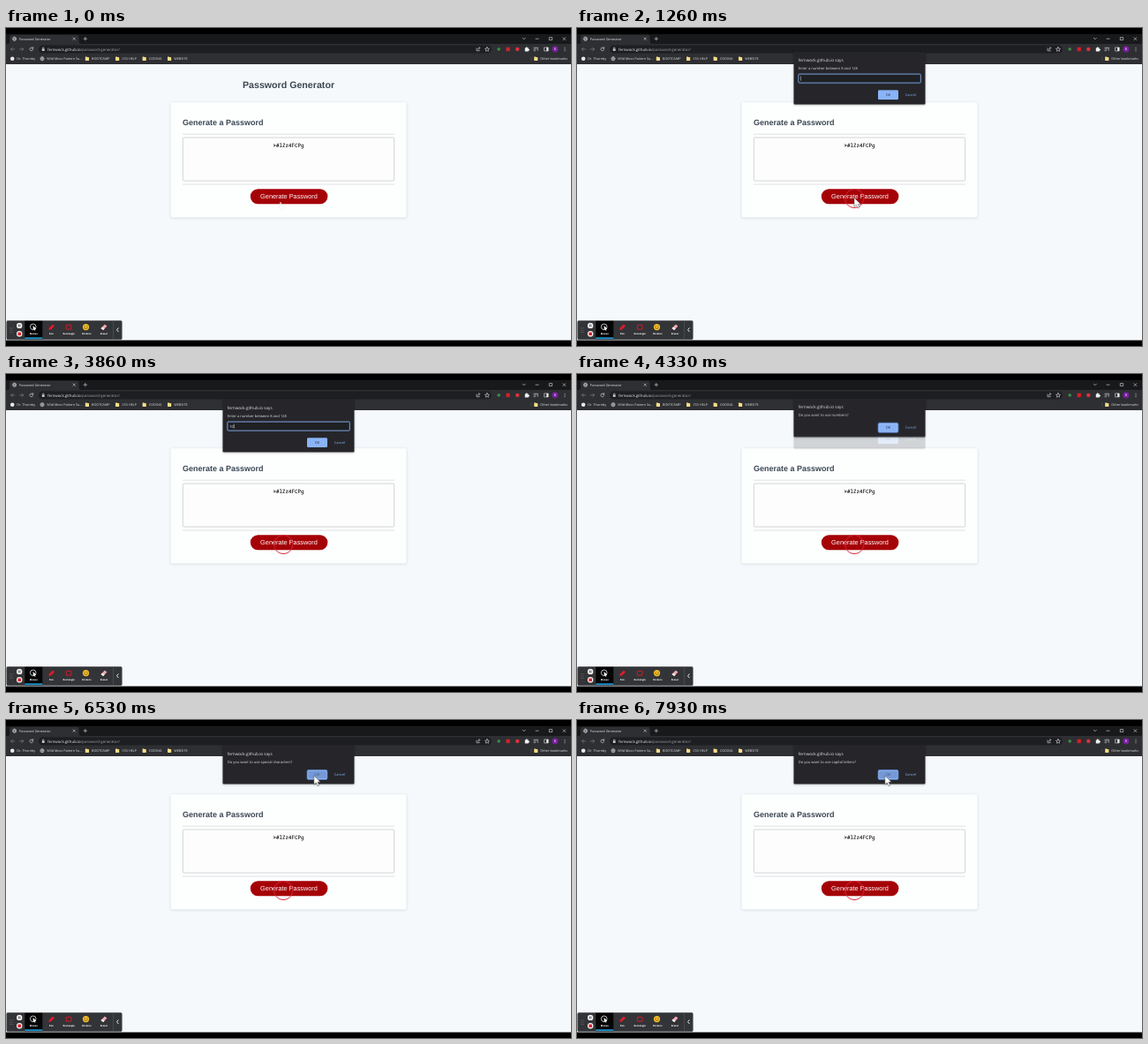
An HTML page for the animation above (8 s loop, 640 by 360 pixels).

```html
<!DOCTYPE html>
<html lang="en">
<head>
<meta charset="utf-8">
<title>Password Generator</title>
<style>
html, body { margin: 0; width: 100%; height: 100%; overflow: hidden; background: #000; }
svg { display: block; width: 100vw; height: 100vh; }
text { font-family: "Open Sans", "Noto Sans", sans-serif; text-rendering: geometricPrecision; }
.page text { font-family: "Liberation Sans", Arial, sans-serif; }
.page .mono { font-family: "Noto Sans Mono", "DejaVu Sans Mono", monospace; }
.ui { font-size: 3.75px; fill: #e2e4e7; }
.line { fill: none; stroke: #d0d3d6; stroke-width: .65; stroke-linecap: round; stroke-linejoin: round; }
.mid { text-anchor: middle; }
.head { font-size: 4.65px; fill: #e8eaed; }
.msg { font-size: 4.08px; fill: #dcdee2; }
.btn { font-size: 3.9px; text-anchor: middle; }
.label { font-size: 2.7px; font-weight: 700; fill: #fff; text-anchor: middle; }

.anim { animation: 8s linear infinite; }
.prompt { animation-name: prompt; }
.numbers { animation-name: numbers; }
.special { animation-name: special; }
.capital { animation-name: capital; }
.hand { animation-name: hand; }
.arrow { animation-name: arrow; }
.ripple { animation-name: ripple; }
.caret { animation-name: caret; }
.hover { animation-name: hover; }
.d1 { animation-name: digit1; }
.d2 { animation-name: digit2; }

@keyframes prompt {
  0%, 14.1% { opacity: 0; transform: translateY(-7px); }
  15.2% { opacity: 1; }
  16.4%, 52.9% { opacity: 1; transform: none; }
  54.4%, 100% { opacity: 0; transform: translateY(-4.8px); }
}
@keyframes numbers {
  0%, 52.9% { opacity: 0; transform: translateY(-7px); }
  53.7% { opacity: 1; }
  54.1% { transform: translateY(-1.3px); }
  54.9%, 75.8% { opacity: 1; transform: none; }
  76.6%, 100% { opacity: 0; transform: none; }
}
@keyframes special {
  0%, 75% { opacity: 0; transform: translateY(-7px); }
  75.8% { opacity: 1; }
  76.2% { transform: translateY(-1.3px); }
  77%, 87.7% { opacity: 1; transform: none; }
  88.5%, 100% { opacity: 0; transform: none; }
}
@keyframes capital {
  0%, 86.9% { opacity: 0; transform: translateY(-7px); }
  87.7% { opacity: 1; }
  88.1% { transform: translateY(-1.3px); }
  88.9%, 100% { opacity: 1; transform: none; }
}
@keyframes hand {
  0% { opacity: 1; transform: translate(311px, 197px); }
  3% { transform: translate(311.2px, 196.6px); }
  10%, 14.9% { opacity: 1; transform: translate(313.6px, 191.6px); }
  15%, 100% { opacity: 0; transform: translate(313.6px, 191.6px); }
}
@keyframes arrow {
  0%, 14.9% { opacity: 0; transform: translate(314px, 192px); }
  15%, 16.5% { opacity: 1; transform: translate(314px, 192px); animation-timing-function: ease-in-out; }
  25.8%, 40.7% { opacity: 1; transform: translate(335px, 65px); }
  40.75%, 59.1% { opacity: 0; transform: translate(335px, 65px); }
  59.15% { opacity: 1; transform: translate(335px, 65px); animation-timing-function: ease-in-out; }
  65%, 70% { transform: translate(347.6px, 62.2px); }
  75%, 100% { opacity: 1; transform: translate(348.8px, 62.8px); }
}
@keyframes ripple {
  0%, 11.5% { opacity: 0; transform: scale(.3); }
  11.6% { opacity: 1; transform: scale(.4); }
  12.4%, 100% { opacity: 1; transform: none; }
}
@keyframes caret {
  0%, 33.2% { opacity: 1; transform: none; }
  33.25%, 39.9% { opacity: 0; transform: none; }
  40%, 40.7% { opacity: 1; transform: none; }
  40.75%, 42.4% { opacity: 1; transform: translateX(2.4px); }
  42.5%, 49% { opacity: 1; transform: translateX(4.8px); }
  49.1%, 100% { opacity: 0; transform: translateX(4.8px); }
}
@keyframes digit1 { 0%, 40.7% { opacity: 0; } 40.75%, 100% { opacity: 1; } }
@keyframes digit2 { 0%, 42.4% { opacity: 0; } 42.5%, 100% { opacity: 1; } }
@keyframes hover { 0%, 62.9% { opacity: 0; } 63.4%, 100% { opacity: 1; } }
</style>
</head>
<body>
<svg viewBox="0 0 640 360" preserveAspectRatio="none">
  <defs>
    <filter id="cardShade" x="-10%" y="-10%" width="120%" height="125%">
      <feDropShadow dx="0" dy=".7" stdDeviation="1.6" flood-color="#2c3e50" flood-opacity=".2"/>
    </filter>
    <filter id="boxShade" x="-10%" y="-10%" width="120%" height="130%">
      <feDropShadow dx="0" dy=".5" stdDeviation=".8" flood-opacity=".3"/>
    </filter>
    <path id="folder" d="M0 .4Q0 0 .4 0H1.7L2.3.7H3.8Q4.2.7 4.2 1.1V4.200Q4.200 4.600 3.800 4.600H.4Q0 4.600 0 4.200Z" fill="#f6dc86"/>
    <g id="globe" fill="none" stroke="#d3d5d8" stroke-width=".6">
      <circle r="2.1"/><ellipse rx=".9" ry="2.1"/><path d="M-2.1 0H2.1"/>
    </g>
    <g id="confirm">
      <rect x="245.5" y="29" width="149" height="43.6" rx="1" fill="#25272a" filter="url(#boxShade)"/>
      <text class="head" x="250.8" y="40">fernwock.github.io says</text>
      <rect x="341.1" y="56.5" width="22.8" height="10.9" rx="1.5" fill="#8ab4f8" stroke="#4c74b4" stroke-width="1"/>
      <rect x="341.9" y="57.3" width="21.2" height="9.3" rx=".9" fill="none" stroke="#b5cffa" stroke-width=".5"/>
      <text class="btn" x="352.4" y="63.3" fill="#202938">OK</text>
      <text class="btn" x="377.8" y="63.3" fill="#8ab4f8">Cancel</text>
    </g>
    <rect id="shade" x="342.2" y="57.6" width="20.6" height="8.7" rx=".8" fill="#5e7eb4" opacity=".5"/>
  </defs>

  <!-- page -->
  <g class="page">
    <rect y="41" width="640" height="312.5" fill="#f6f9fb"/>
    <text class="mid" x="320" y="67.8" font-size="10.65" font-weight="700" fill="#3b4753">Password Generator</text>
    <rect x="186.8" y="84.2" width="266.6" height="130" rx="1.6" fill="#fdfefe" filter="url(#cardShade)"/>
    <text x="200" y="110.2" font-size="9" font-weight="700" fill="#3b4753">Generate a Password</text>
    <path d="M200 120.2H440M200 177H440" stroke="#d2d5d8" stroke-width=".7"/>
    <rect x="200.3" y="124" width="239.4" height="49" rx="1.2" fill="#fdfdfd" stroke="#c3c6c9" stroke-width=".75"/>
    <text class="mono mid" x="320" y="135.1" font-size="5.83" fill="#16181a" stroke="#16181a" stroke-width=".12">&gt;#lZz4FCPg</text>
    <rect x="276.8" y="182.2" width="87.6" height="17.1" rx="8.55" fill="#a50207"/>
    <text class="mid" x="320.5" y="193.4" font-size="7.33" fill="#fff">Generate Password</text>
    <g transform="translate(314.2 193)">
      <circle class="anim ripple" r="10.6" fill="none" stroke="#dc2a3c" stroke-width="1"/>
    </g>
  </g>

  <!-- browser frame -->
  <rect width="640" height="41" fill="#2e2f32"/>
  <rect width="640" height="18" fill="#18191b"/>
  <rect width="640" height="6.8" fill="#000"/>
  <path d="M2 18Q4 18 4 16V10Q4 7.8 6.2 7.8H80.5Q82.7 7.8 82.7 10V16Q82.7 18 84.7 18Z" fill="#2e2f32"/>
  <use href="#globe" x="9.6" y="12.3"/>
  <text class="ui" x="14.8" y="13.6">Password Generator</text>
  <path class="line" d="M76 11l2.4 2.4M78.4 11L76 13.4M88 12.2h3.6M89.8 10.4v3.6"/>
  <path class="line" d="M585.3 11.3l1.5 1.5 1.5-1.5M600 12.2h3.2M615.7 10.6h3v3h-3zM631 10.8l2.8 2.8M633.8 10.8l-2.8 2.8"/>

  <rect x="37" y="19.6" width="513" height="9" rx="4.5" fill="#1d1e21"/>
  <path class="line" stroke-opacity=".5" d="M9.8 24H5.6M7.4 22.2L5.6 24l1.8 1.8M15.4 24h4.2M17.8 22.2l1.8 1.8-1.8 1.8"/>
  <path class="line" d="M30.5 23a1.9 1.9 0 1 0 .1 1.7M30.7 21.7V23.2H29.2"/>
  <path d="M40.8 23.6h2.8v2.3h-2.8z" fill="#d0d3d6"/>
  <path class="line" d="M41.4 23.4v-.7a.8.8 0 0 1 1.6 0v.7"/>
  <text x="47" y="25.5" font-size="4.35" fill="#eceef0">fernwock.github.io<tspan fill="#9fa3a8">/password-generator/</tspan></text>
  <path class="line" d="M533 23v2.8h3.2V25M534.4 24.2q.2-1.7 2.3-1.7M535.7 21.5l1 1-1 1"/>
  <path class="line" d="M545 21.6l.75 1.6 1.75.2-1.3 1.2.35 1.7-1.55-.85-1.55.85.35-1.7-1.3-1.2 1.75-.2z"/>
  <circle cx="558.2" cy="24" r="1.8" fill="#3c8d4c"/>
  <rect x="566.6" y="21.8" width="4.2" height="4.4" fill="#d3202b"/>
  <circle cx="579.3" cy="24" r="2.2" fill="#d8323c"/>
  <path d="M587.8 22.6h1.3a.8.8 0 1 1 1.4 0h1.3v1.3a.8.8 0 1 1 0 1.4v1.2h-4z" fill="#f0f1f2"/>
  <path class="line" d="M598 22.3h4M598 24h2.5M598 25.7h1.5M602.3 22.5v3"/>
  <path class="line" d="M610 22h4.2v4H610z"/>
  <path d="M612.2 22h2v4h-2z" fill="#e8eaed"/>
  <circle cx="622" cy="24" r="3.4" fill="#7a1fa2"/>
  <text class="mid" x="622" y="25.3" font-size="3.5" fill="#fff">B</text>
  <g fill="#d0d3d6"><circle cx="633" cy="22.3" r=".5"/><circle cx="633" cy="24" r=".5"/><circle cx="633" cy="25.7" r=".5"/></g>

  <circle cx="7.2" cy="34.7" r="2.3" fill="#e8e8e8"/>
  <text class="ui" x="12.3" y="36.1">Dr. Thornby</text>
  <use href="#globe" x="41" y="34.7"/>
  <text class="ui" x="46.3" y="36.1">Wild Moss Pattern Su...</text>
  <use href="#folder" x="89.8" y="32.4"/><text class="ui" x="97" y="36.1">BOOTCAMP</text>
  <use href="#folder" x="124" y="32.4"/><text class="ui" x="131.5" y="36.1">CSS HELP</text>
  <use href="#folder" x="154.6" y="32.4"/><text class="ui" x="162" y="36.1">CODING</text>
  <use href="#folder" x="183" y="32.4"/><text class="ui" x="190.3" y="36.1">WEBSITE</text>
  <path d="M595 32.2v5" stroke="#5a5c60" stroke-width=".5"/>
  <use href="#folder" x="598.2" y="32.4"/><text class="ui" x="605.3" y="36.1">Other bookmarks</text>

  <!-- dialogs -->
  <g class="anim prompt">
    <rect x="245.5" y="29" width="149" height="59.4" rx="1" fill="#25272a" filter="url(#boxShade)"/>
    <text class="head" x="250.8" y="40">fernwock.github.io says</text>
    <text class="msg" x="250.8" y="49.4">Enter a number between 8 and 128</text>
    <rect x="250.9" y="54.1" width="138.4" height="10" rx="1" fill="#1e2023" stroke="#8ab4f8" stroke-width=".9"/>
    <g font-size="4.2" fill="#e8eaed">
      <text class="anim d1" x="253.2" y="60.7">1</text>
      <text class="anim d2" x="255.6" y="60.7">0</text>
    </g>
    <path class="anim caret" d="M253.6 56.5v5.2" stroke="#e8eaed" stroke-width=".55"/>
    <rect x="341" y="72.3" width="23" height="10.7" rx="1.3" fill="#8ab4f8"/>
    <text class="btn" x="352.4" y="79.1" fill="#202938">OK</text>
    <text class="btn" x="377.8" y="79.1" fill="#8ab4f8">Cancel</text>
  </g>
  <g class="anim numbers">
    <use href="#confirm"/>
    <text class="msg" x="250.8" y="49.4">Do you want to use numbers?</text>
    <g class="anim hover"><use href="#shade"/></g>
  </g>
  <g class="anim special">
    <use href="#confirm"/>
    <text class="msg" x="250.8" y="49.4">Do you want to use special characters?</text>
    <use href="#shade"/>
  </g>
  <g class="anim capital">
    <use href="#confirm"/>
    <text class="msg" x="250.8" y="49.4">Do you want to use capital letters?</text>
    <use href="#shade"/>
  </g>

  <!-- recorder bar -->
  <rect x=".7" y="331.3" width="130.6" height="21.4" rx="1.5" fill="#333437" stroke="#5c5f62" stroke-width=".6"/>
  <rect x="21.3" y="331.7" width="20" height="20.6" fill="#050505"/>
  <rect x="21.3" y="350.2" width="20" height="1.9" fill="#1c8fc4"/>
  <path d="M5 339.5v6M7 339.5v6" stroke="#888" stroke-width=".8" stroke-dasharray=".8 1.5"/>
  <circle cx="15.2" cy="336.9" r="3.2" fill="#f4f4f4"/>
  <path d="M14.4 335.5v2.8M16 335.5v2.8" stroke="#222" stroke-width=".7"/>
  <circle cx="15.2" cy="346.2" r="3.2" fill="#f4f4f4"/>
  <rect x="13.4" y="344.4" width="3.6" height="3.6" rx=".5" fill="#d9252f"/>
  <circle cx="30.7" cy="338.3" r="3.3" fill="none" stroke="#e8e8e8" stroke-width=".8"/>
  <path d="M30.7 337v5.2l1.2-1.1.8 1.6.8-.4-.8-1.6h1.6z" fill="#fff"/>
  <path d="M48.3 341.8l.5-2.2 4.2-4 2 2-4.3 3.9z" fill="#e01b2c"/>
  <path d="M68.3 336.3h5.600v4.800h-5.600z" fill="none" stroke="#d3182a" stroke-width="1"/>
  <circle cx="90.5" cy="338.6" r="3.6" fill="#f4bf2c"/>
  <path d="M88.6 339.5q1.900 2.200 3.800 0M89.2 337.3v.5M91.8 337.3v.5" fill="none" stroke="#59400d" stroke-width=".7" stroke-linecap="round"/>
  <path d="M107.5 340l4.300-4.400 2.600 2-4.300 4.400z" fill="#f1a9b3"/>
  <path d="M107.500 340l1.500-1.500 2.600 2-1.500 1.500z" fill="#f7f1f1"/>
  <text class="label" x="31.3" y="346.9">Mouse</text>
  <text class="label" x="51.3" y="346.9">Pen</text>
  <text class="label" x="71.2" y="346.9">Rectangle</text>
  <text class="label" x="91.2" y="346.9">Stickers</text>
  <text class="label" x="111" y="346.9">Eraser</text>
  <path d="M121.5 331.7v20.6" stroke="#55585b" stroke-width=".6"/>
  <path d="M127.4 339.4l-1.9 2.3 1.9 2.3" fill="none" stroke="#fff" stroke-width=".9"/>

  <!-- pointers -->
  <g class="anim hand">
    <path d="M-.6.5Q0-.3.6.5V3.3q.9-.4 1.2.3.8-.3 1.1.4.9-.1.9.8V6.2L3.1 8.5H-.2L-2.3 5.4q.3-.9 1.7.1Z" fill="#fff" stroke="#c4c6c8" stroke-width=".2"/>
  </g>
  <g class="anim arrow">
    <path d="M0 0V10.4L2.4 8.2 4 12l1.9-.8L4.3 7.5H7.5Z" fill="#fff" stroke="#111" stroke-width=".4"/>
  </g>
</svg>
</body>
</html>
```
